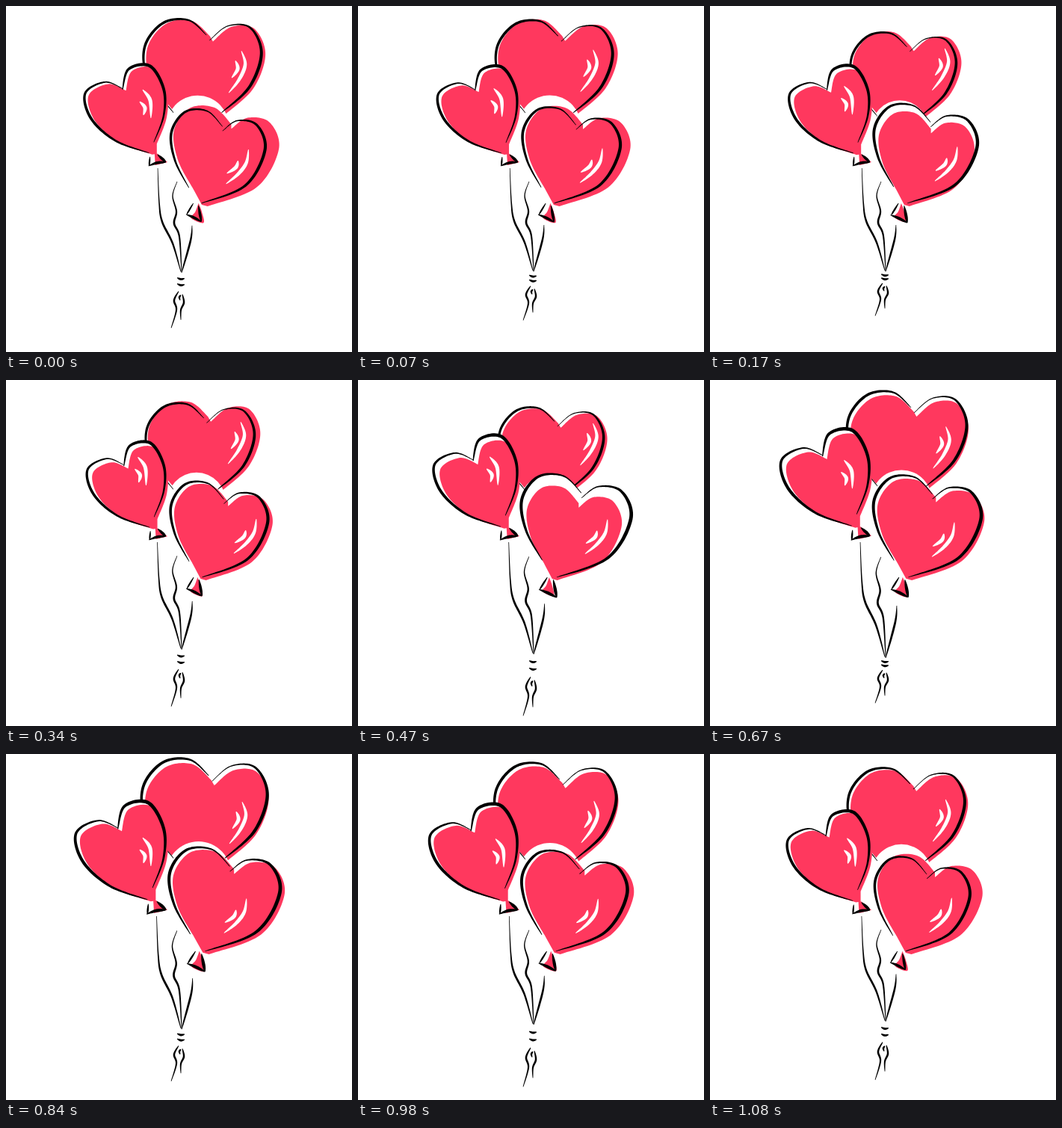
An HTML page with a canvas that plays this animation: 463x463 px, repeating every 1110 ms.

```html
<!DOCTYPE html>
<html lang="en">
<head>
<meta charset="utf-8">
<title>Heart balloons</title>
<style>
html, body { margin: 0; width: 100%; height: 100%; overflow: hidden; background: #fff; }
canvas { display: block; }
</style>
</head>
<body>
<canvas id="stage" width="463" height="463"></canvas>
<script>
const ctx = document.getElementById('stage').getContext('2d');
const RED = '#ff385e', INK = '#000', WHITE = '#fff';
const LOOP = 1110, STEPS = 33;

// Cosine that peaks at a given step and repeats n times per loop.
const swing = (s, peak, n = 1) => Math.cos(2 * Math.PI * n * (s - peak) / STEPS);

// Flat x, y key points -> dense points of a Catmull-Rom spline.
function spline(...a) {
  const p = [], out = [];
  for (let i = 0; i < a.length; i += 2) p.push([a[i], a[i + 1]]);
  const last = p.length - 1, at = i => p[Math.max(0, Math.min(last, i))];
  for (let i = 0; i < last; i++) {
    for (let u = 0; u < 1; u += 1 / 16) {
      out.push([0, 1].map(c => {
        const [q, r, s, t] = [at(i - 1)[c], at(i)[c], at(i + 1)[c], at(i + 2)[c]];
        return r + u / 2 * (s - q + u * (2 * q - 5 * r + 4 * s - t + u * (3 * (r - s) + t - q)));
      }));
    }
  }
  out.push(p[last]);
  return out;
}

function fill(pts, color) {
  ctx.fillStyle = color;
  ctx.beginPath();
  pts.forEach(p => ctx.lineTo(...p));
  ctx.fill();
}

// Tapered stroke; skew above 1 moves the thick part towards the end.
function brush(pts, width, skew = 1, color = INK) {
  const n = pts.length - 1, one = [], two = [];
  pts.forEach(([x, y], i) => {
    const a = pts[Math.max(0, i - 1)], b = pts[Math.min(n, i + 1)];
    const dx = b[0] - a[0], dy = b[1] - a[1], len = Math.hypot(dx, dy) || 1;
    const h = 0.35 + (width / 2 - 0.35) * Math.sin(Math.PI * (i / n) ** skew);
    one.push([x - dy / len * h, y + dx / len * h]);
    two.unshift([x + dy / len * h, y - dx / len * h]);
  });
  fill(one.concat(two), color);
}

// Draw scaled around (cx, cy), then moved by (dx, dy).
function posed(draw, cx, cy, sx, sy = sx, dx = 0, dy = 0) {
  ctx.setTransform(sx, 0, 0, sy, cx - sx * cx + dx, cy - sy * cy + dy);
  draw();
  ctx.resetTransform();
}

// The ink and the colour of a balloon swell separately around its pivot.
const balloons = [
  {
    left: spline(268,40, 244,20, 210,24, 186,55, 190,97, 224,143),
    right: spline(272,47, 296,28, 326,30, 341,64, 325,109, 288,143),
    tip: [250, 172], pivot: [223, 190], shift: [4, 3], squash: 1,
    skew: [1, 1.9],
    ink: s => .98 + .083 * swing(s, 26) + .03 * swing(s, 10, 4),
    color: s => .985 + .06 * swing(s, 27) + .035 * swing(s, 10, 4),
    shine: [spline(315,60, 320,78, 312,98, 298,116), spline(307,73, 310,84, 302,96)],
    glide: s => [swing(s, 25), 4 * swing(s, 25)],
    halo: [252, 162, 42, 44]
  },
  {
    left: spline(158,113, 134,104, 108,119, 116,152, 148,181, 192,197),
    right: spline(157,114, 165,87, 193,83, 211,113, 211,148, 198,183),
    tip: [198, 196], pivot: [212, 212], shift: [4, 2], squash: 1,
    skew: [1.3, .8], back: true,
    ink: s => 1.065 + .075 * swing(s, 23) + .02 * swing(s, 5.5, 3),
    color: s => 1.04 + .075 * swing(s, 24) + .015 * swing(s, 5.5, 3),
    shine: [spline(180,108, 190,122, 191,146), spline(176,124, 183,132, 181,142)],
    glide: s => [4 * swing(s, 29), 5.5 * swing(s, 29)],
    knot: [[195, 195], [199, 196], [212, 207], [196, 211]],
    knotInk: [spline(193,202, 192,214), spline(191,214, 202,210, 214,209), spline(203,199, 214,209)]
  },
  {
    left: spline(291,160, 270,139, 240,140, 221,168, 226,206, 245,243),
    right: spline(291,166, 311,152, 338,158, 349,192, 322,240, 262,264),
    tip: [255, 262], pivot: [234, 264], shift: [5, 4], squash: .6,
    skew: [1.3, 1.5], back: true,
    ink: s => 1.085 + .07 * swing(s, 20) + .055 * swing(s, 4.9, 3),
    color: s => 1.07 + .08 * swing(s, 26) + .03 * swing(s, 10, 4),
    shine: [spline(328,190, 325,208, 314,223, 298,236), spline(314,205, 311,214, 299,222)],
    glide: s => [7 * swing(s, 11), -4 * swing(s, 11)],
    knot: spline(251,260, 255,271, 257,285, 242,279, 247,271, 251,260),
    knotInk: [spline(251,264, 242,279), spline(241,279, 251,283, 262,289), spline(258,267, 262,289)]
  }
];

function drawBalloon(b, s) {
  const heart = [...b.left, b.tip, ...[...b.right].reverse()];
  const scaled = (draw, k, shift = []) =>
    posed(draw, ...b.pivot, k, 1 + b.squash * (k - 1), ...shift);
  const ink = b.ink(s), color = b.color(s);

  if (b.back) scaled(() => fill(heart, WHITE), ink);
  scaled(() => {
    fill(heart, RED);
    if (b.knot) fill(b.knot, RED);
    if (b.halo) {
      ctx.fillStyle = WHITE;
      ctx.beginPath();
      ctx.ellipse(...b.halo, 0, 0, 7);
      ctx.fill();
    }
  }, color, b.shift);
  posed(() => b.shine.forEach(p => brush(p, 5, 1, WHITE)), 0, 0, 1, 1, ...b.glide(s));
  scaled(() => {
    brush(b.left, 3.6, b.skew[0]);
    brush(b.right, 4.2, b.skew[1]);
    (b.knotInk || []).forEach((p, i) => brush(p, i ? 3.8 : 2.2, 1.2));
  }, ink);
}

const cords = [
  spline(203,217, 205,264, 209,289, 223,318, 234,356),
  spline(229,235, 223,254, 228,275, 225,291, 232,309, 235,357),
  spline(249,294, 247,314, 235,357)
];
const dash = spline(-5,-2, 0,0, 5,-1);
const tail = [
  spline(1,0, -5,12, -2,25, -9,49),
  spline(4,5, 2,8, 3,12),
  spline(6,4, 8,15, 4,25, 4,38)
];

function drawCords(s) {
  const stretch = 1.045 + .06 * swing(s, 20), gap = 7.5 + 2.5 * swing(s, 13, 2);
  const bind = 217 + 140 * stretch;
  posed(() => cords.forEach(p => brush(p, 2.7, 1.4)),
    234, 217, 1 + .6 * (stretch - 1), stretch);
  for (const k of [1.1, 2.1]) {
    posed(() => brush(dash, 3), 0, 0, 1, 1, 234, bind + k * gap);
  }
  posed(() => tail.forEach(p => brush(p, 2.6, .8)),
    0, 0, 1, .72 + .035 * gap, 230, bind + 3.1 * gap);
}

function frame() {
  const t = performance.now() % LOOP;
  const s = Math.min(STEPS - 1, Math.floor((t + 5) * STEPS / LOOP));
  ctx.fillStyle = WHITE;
  ctx.fillRect(0, 0, 463, 463);
  balloons.forEach(b => drawBalloon(b, s));
  drawCords(s);
  requestAnimationFrame(frame);
}
frame();
</script>
</body>
</html>
```
